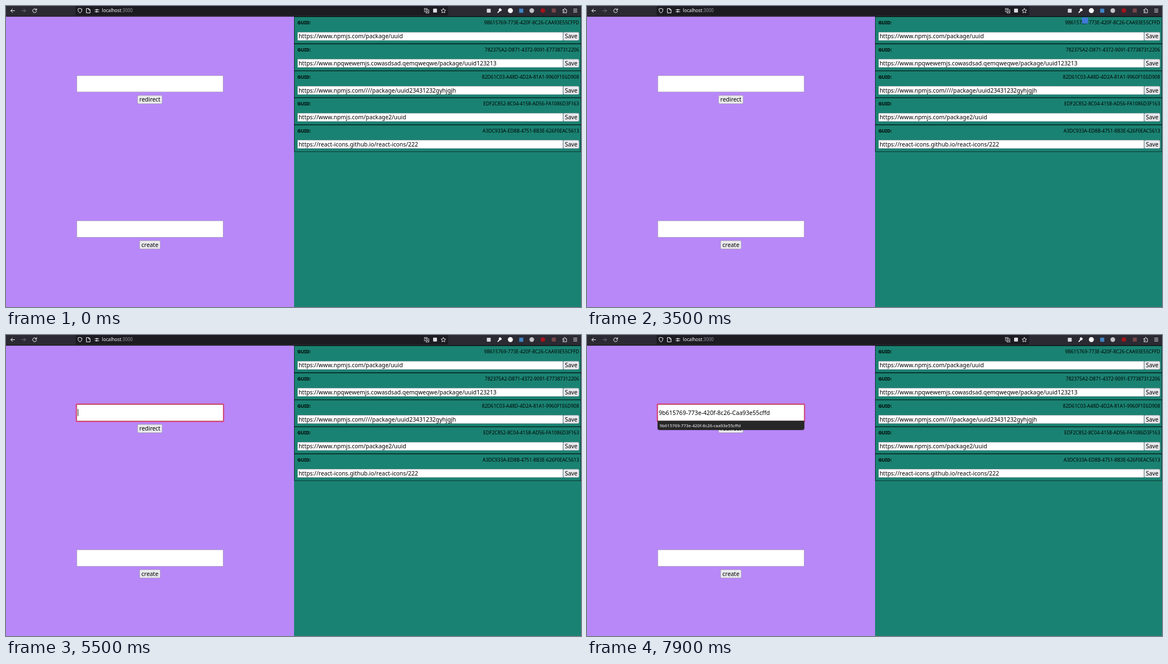
An HTML page for the animation above (8000 ms loop, 1034x542 px).

```html
<!DOCTYPE html>
<html lang="en">
<head>
<meta charset="utf-8">
<title>GUID redirect</title>
<style>
  html, body { margin: 0; width: 100%; height: 100%; overflow: hidden; background: #b888f8; }
  svg { display: block; }
  text { font-family: "Noto Sans", "Open Sans", sans-serif; font-size: 10.42px; fill: #000; white-space: pre; }
  .guid { font-size: 8.57px; text-anchor: end; }
  .label { font-size: 8.35px; font-weight: 700; }
  .mid { text-anchor: middle; }
  .url { font-size: 8.18px; fill: #fbfbfe; }
  .item { font-size: 7.8px; fill: #fbfbfe; }
  .typed { font-size: 10.62px; }
  .field { fill: #fff; stroke: #8f8f9d; stroke-width: .55; }
  .field.hover { stroke: #55555f; }
  .button { fill: #e9e9ed; stroke: #8f8f9d; stroke-width: .6; }
  .line { fill: none; stroke: #fbfbfe; stroke-width: 1; stroke-linecap: round; stroke-linejoin: round; }
</style>
</head>
<body>
<svg id="stage" width="1034" height="542" viewBox="0 0 1034 542" xmlns="http://www.w3.org/2000/svg"></svg>
<script>
const LOOP = 8000;
const stage = document.getElementById('stage');

function add(tag, attrs, content = '', parent = stage) {
  const node = document.createElementNS('http://www.w3.org/2000/svg', tag);
  for (const key in attrs) node.setAttribute(key, attrs[key]);
  node.textContent = content;
  parent.append(node);
  return node;
}
const box = (x, y, width, height, attrs = {}, parent = stage) =>
  add('rect', { x, y, width, height, ...attrs }, '', parent);
const label = (x, y, content, kind = '', parent = stage) =>
  add('text', { x, y, class: kind }, content, parent);
const line = (d, attrs = {}) => add('path', { d, class: 'line', ...attrs });
const dot = (cx, cy, r, fill) => add('circle', { cx, cy, r, fill });

function drawToolbar() {
  box(0, 0, 1034, 19, { fill: '#2b2a33' });
  box(125, 0, 670, 17, { fill: '#1c1b22', rx: 2 });
  box(0, 18.4, 1034, .8, { fill: '#0c0c0d' });

  line('M15.5 8.5H8.7M11.7 5.4L8.6 8.5L11.7 11.6');
  line('M28.3 8.5H35.1M32.1 5.4L35.2 8.5L32.1 11.6', { style: 'stroke:#74737b' });
  line('M54.4 6.6A3.5 3.5 0 1 0 54.9 9.4M55 4.7V7.3H52.4');

  line('M133 4.4L136.5 5.6C136.5 9 135.5 11.2 133 12.6C130.5 11.2 129.5 9 129.5 5.6Z');
  line('M145 4.6H148.8L151.2 7V12.4H145ZM148.8 4.6V7H151.2');
  line('M160 6.8H162.3M164.8 6.8H167M160 10.3H161.8M164.4 10.3H167');
  dot(163.4, 6.8, 1.2, '#fbfbfe');
  dot(162.9, 10.3, 1.2, '#fbfbfe');

  const url = label(172.6, 11.4, 'localhost', 'url');
  add('tspan', { fill: '#98979f' }, ':3000', url);

  // page tools
  box(752.3, 4.3, 5, 6, { fill: 'none', stroke: '#d5d5da', 'stroke-width': .8 });
  box(755.6, 6.8, 5, 6, { fill: '#1c1b22', stroke: '#d5d5da', 'stroke-width': .8 });
  line('M756.8 11.4L758.1 8.3L759.4 11.4M753.5 6.2H756', { 'stroke-width': .7, style: 'stroke-width:.7' });
  box(768, 4.8, 7, 7, { fill: '#dcdce0', rx: 1 });
  line('M786.5 4.3L787.8 7L790.7 7.4L788.6 9.4L789.1 12.3L786.5 10.9L783.9 12.3L784.4 9.4L782.3 7.4L785.2 7Z',
    { style: 'stroke-width:.9' });

  // extensions
  box(864.6, 5, 7, 7, { fill: '#d6d6da', rx: 1 });
  line('M884.6 11.6L887.7 8.5', { style: 'stroke-width:1.9' });
  line('M890.9 6.1A2.2 2.2 0 1 1 889.2 4.6L888.8 6.7Z', { style: 'fill:#fbfbfe' });
  dot(907, 8.3, 4.5, '#fff');
  box(922.8, 4.8, 7.4, 7.4, { fill: '#3f83c4' });
  dot(945.5, 8.2, 4.2, '#c3c3c7');
  dot(965.4, 8.2, 4, '#a3141b');
  box(981.4, 4.6, 7.2, 7.2, { fill: '#75464a' });
  line('M1001.6 6.5H1003.5V5.5A1.2 1.2 0 0 1 1005.9 5.5V6.5H1008V12.2H1001.6V10.4H1002.8A1 1 0 0 0 1002.8 8.3H1001.6Z',
    { style: 'stroke-width:.9' });
  line('M1020.6 5.6H1026.8M1020.6 8.3H1026.8M1020.6 11H1026.8', { style: 'stroke-width:.9' });
}

function drawButton(x, y, w, h, content) {
  box(x, y, w, h, { class: 'button', rx: 2 });
  label(x + w / 2, y + 11.2, content, 'mid');
}

const ROWS = [
  ['9B615769-773E-420F-8C26-CAA93E55CFFD', 'https://www.npmjs.com/package/uuid'],
  ['782375A2-D871-4372-9091-E77387312206', 'https://www.npqwewemjs.cowasdsad.qemqweqwe/package/uuid123213'],
  ['82D61C03-A48D-4D2A-81A1-9960F1E6D908', 'https://www.npmjs.com////package/uuid23431232gyhjgjh'],
  ['EDF2C852-8C04-4158-AD56-FA1086D3F163', 'https://www.npmjs.com/package2/uuid'],
  ['A3DC933A-ED8B-4751-8B3E-626F0EAC5613', 'https://react-icons.github.io/react-icons/222'],
];
const HISTORY = [
  '0086fbb4-ee5e-4bd9-9090-6f8ca444a202', 'aaa',
  '8109d422-923e-4356-aa7f-b42ad6ba42a0', 'fb0b0030-dfb5-4d8b-a4d0-38bbb00ca497',
  '82d61c03-a48d-4d2a-81a1-9960f1e6d908', '9b615769-773e-420f-8c26-caa93e55cffd',
];

box(0, 19, 518, 523, { fill: '#b888f8' });
box(518, 19, 516, 523, { fill: '#1a8272' });
drawToolbar();

// list of saved addresses
const mark = box(859, 25.2, 40.3, 10.6, { fill: '#fff' });
const rowFields = [];
let head, tail;
ROWS.forEach(([guid, address], i) => {
  const y = 19.4 + 48.62 * i;
  box(518.3, y + .3, 515.5, 48.02, { fill: 'none', stroke: '#000', 'stroke-width': .6 });
  label(524, y + 14, 'GUID:', 'label');
  const code = label(1030.6, y + 14, '', 'guid');
  const first = add('tspan', {}, guid.slice(0, 8), code);
  const rest = add('tspan', {}, guid.slice(8), code);
  if (i === 0) [head, tail] = [first, rest];
  rowFields.push(box(524.3, y + 27.8, 477.2, 14.8, { class: 'field' }));
  label(526.2, y + 39, address);
  drawButton(1002.2, y + 27.8, 28.2, 14.8, 'Save');
});
const badge = box(890.2, 20.8, 10.8, 10.8, { fill: '#3f78d8' });

// forms
drawButton(236.6, 161, 44.3, 15, 'redirect');
const search = box(127.3, 125.3, 263.1, 29.5, { class: 'field' });
box(127.3, 386.9, 263.1, 29.5, { class: 'field' });
drawButton(240.2, 422.5, 37.2, 15, 'create');

const ring = add('g', { fill: 'none' });
box(125.5, 123.6, 266.6, 33, { stroke: '#e64a9a', 'stroke-opacity': .55, 'stroke-width': 1.2, rx: 2 }, ring);
box(126.7, 124.7, 264.3, 30.7, { stroke: '#d92f48', 'stroke-width': 1.2, rx: 1 }, ring);
const typed = label(129, 143.6, '9b615769-773e-420f-8c26-Caa93e55cffd', 'typed');
const caret = box(129, 133, .9, 13, { fill: '#111' });

function drawPopup(items, height) {
  const group = add('g', {});
  const path = (x, y, w, h) =>
    `M${x} ${y}h${w}v${h - 4}q0 4 -4 4h${8 - w}q-4 0 -4 -4z`;
  add('path', { d: path(126.4, 154.5, 265, height + .8), fill: '#000', opacity: .22 }, '', group);
  add('path', { d: path(127, 154.5, 263.8, height), fill: '#272727' }, '', group);
  items.forEach((item, i) => label(130.6, 165.6 + 10.8 * i, item, 'item', group));
  return group;
}
const popups = { all: drawPopup(HISTORY, 70.4), match: drawPopup(HISTORY.slice(-1), 16.4) };

// each step changes only the listed parts of the state
const STEPS = [
  [0, { hover: -1, select: 0, badge: false, field: '', caret: 0, popup: '', typed: false }],
  [1500, { hover: 2 }],
  [1600, { hover: -1 }],
  [1800, { hover: 0 }],
  [1900, { hover: -1 }],
  [2800, { select: 1 }],
  [2900, { badge: true }],
  [3100, { select: 2 }],
  [3500, { select: 0 }],
  [3900, { badge: false }],
  [4100, { select: 1, badge: true }],
  [4300, { select: 2, badge: false }],
  [4500, { badge: true }],
  [5000, { hover: 0 }],
  [5100, { hover: -1 }],
  [5300, { field: 'hover' }],
  [5500, { field: 'focus', caret: 129, select: 0, badge: false }],
  [6700, { popup: 'all', caret: 0 }],
  [7100, { popup: '', caret: 129 }],
  [7500, { popup: 'match', typed: true, caret: 329 }],
  [7900, { caret: 0 }],
];

const show = (node, on) => { node.style.display = on ? '' : 'none'; };

function render(time) {
  const state = Object.assign({}, ...STEPS.filter(([at]) => at <= time).map(step => step[1]));
  rowFields.forEach((field, i) => field.classList.toggle('hover', i === state.hover));
  show(mark, state.select > 0);
  mark.setAttribute('width', state.select === 2 ? 172 : 40.3);
  head.style.fill = state.select > 0 ? '#d0283c' : '';
  tail.style.fill = state.select > 1 ? '#d0283c' : '';
  show(badge, state.badge);
  search.classList.toggle('hover', state.field === 'hover');
  show(ring, state.field === 'focus');
  show(typed, state.typed);
  show(caret, state.caret > 0);
  caret.setAttribute('x', state.caret);
  for (const name in popups) show(popups[name], state.popup === name);
}

const start = performance.now();
function tick() {
  render((performance.now() - start) % LOOP);
  requestAnimationFrame(tick);
}
tick();
</script>
</body>
</html>
```
